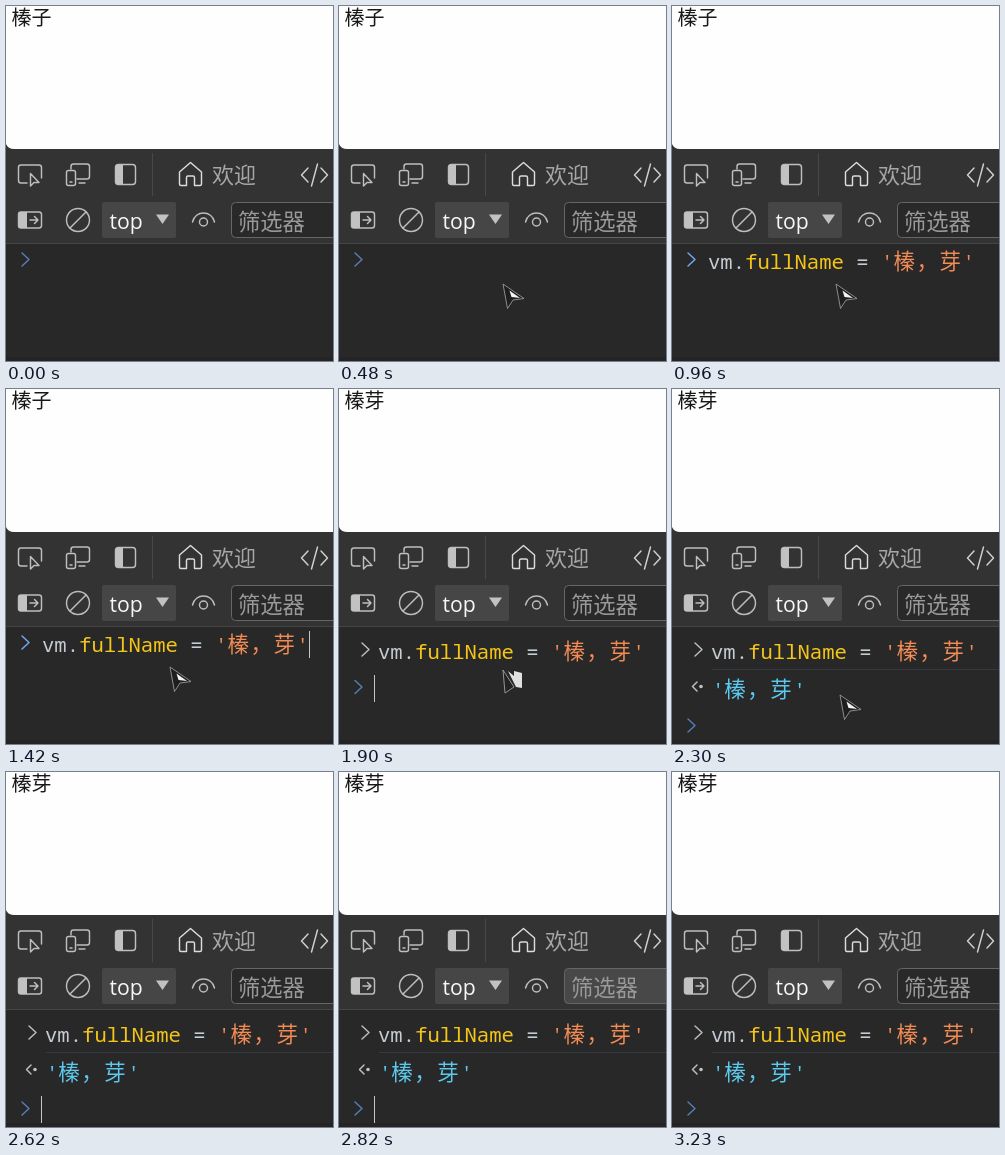
An HTML page that plays this animation: 327 px wide and 355 px high, repeating every 3.89 s.

```html
<!DOCTYPE html>
<html lang="zh-CN">
<head>
<meta charset="utf-8">
<style>
html, body { margin: 0; width: 100%; height: 100%; overflow: hidden; background: #282828; }
svg { display: block; width: 327px; height: 355px; }
text { font-family: "Noto Sans CJK SC", "Noto Sans CJK", sans-serif; white-space: pre; }
.mono { font: 500 20.6px "Noto Sans Mono", monospace; }
.cjk { font: 21.5px "Noto Sans CJK SC", "Noto Sans CJK", sans-serif; letter-spacing: 1.5px; }
.line { fill: none; stroke: #bebebe; stroke-width: 1.45; stroke-linejoin: round; stroke-linecap: round; }
.solid { fill: #c2c2c2; }
</style>
</head>
<body>
<svg viewBox="0 0 327 355">
  <rect width="327" height="355" fill="#282828"/>
  <rect y="130" width="327" height="108" fill="#333"/>
  <path d="M0 0H327V143H8Q2 143 0 138Z" fill="#fefefe"/>
  <path d="M0 237.5H327" stroke="#454545"/>
  <path d="M146.500 147V190" stroke="#484848"/>
  <rect y="351" width="327" height="4" fill="#252324"/>
  <text id="page" x="5.500" y="18.500" font-size="20" fill="#181818"></text>

  <g class="line">
    <path d="M21 177H15Q12.500 177 12.500 174.500V161.500Q12.500 159 15 159H33Q35.500 159 35.500 161.500V172M24.500 167.500V180L28 176.500H33Z"/>
    <path d="M65 163V160.500Q65 158 67.500 158H81Q83.500 158 83.500 160.500V170.500Q83.500 173 81 173H71M73 177H79"/>
    <rect x="60.500" y="164.500" width="9" height="15" rx="2"/>
    <path d="M64 176H66"/>
    <rect x="109.500" y="158.500" width="20" height="20" rx="3"/>
    <path d="M173.500 166L184.500 156.500L195.500 166V178Q195.500 179.500 194 179.500H188.500V171.500Q188.500 170 187 170H182Q180.500 170 180.500 171.500V179.500H175Q173.500 179.500 173.500 178Z" stroke="#dcdcdc"/>
    <path d="M302 162L295.500 169L302 176M315 162L321.500 169L315 176M311.500 158L305.500 180" stroke="#d0d0d0"/>
    <rect x="12.500" y="206" width="23" height="16" rx="2.500"/>
    <path d="M24 214H32M28.500 210.500L32 214L28.500 217.500"/>
    <circle cx="72" cy="214" r="11.500"/>
    <path d="M64 222L80 206"/>
    <path d="M186.500 216C189 204 206 204 208.500 216"/>
    <circle cx="197.500" cy="216" r="4"/>
  </g>
  <path class="solid" d="M110 159H117V178H110ZM13 206H21V222H13Z"/>
  <text x="206" y="176.500" font-size="22" fill="#a6a6a6">欢迎</text>

  <rect x="96" y="196" width="74" height="36" rx="2" fill="#464646"/>
  <text x="103.500" y="222.500" fill="#f8f8f8" style="font:500 21.2px 'Open Sans',sans-serif">top</text>
  <path class="solid" d="M150 208.500H163L156.500 218Z"/>
  <rect id="filter" x="225.500" y="196.500" width="120" height="35" rx="4" stroke="#666"/>
  <text x="232" y="223.500" font-size="22.300" fill="#999">筛选器</text>

  <g id="command">
    <text class="mono" fill="#c4ccd4"><tspan id="object"></tspan><tspan id="property" fill="#f5c518"></tspan><tspan id="equals"></tspan><tspan id="open" fill="#f28b54"></tspan><tspan id="word" class="cjk" fill="#f28b54"></tspan><tspan id="close" fill="#f28b54"></tspan></text>
  </g>
  <path id="sent" class="line" d="M23 254L30 260.500L23 267"/>
  <path id="rule" d="M40 280.500H327" stroke="#353a42"/>
  <g id="result">
    <path class="line" d="M25 293L20.500 297.500L25 302"/>
    <circle class="solid" cx="29" cy="297.500" r="1.800"/>
    <text class="mono" x="40" y="308" fill="#5cc9ee">'<tspan class="cjk">榛，芽</tspan>'</text>
  </g>
  <path id="prompt" class="line" d="M-3.500 -6.500L3.500 0L-3.500 6.500"/>
  <rect id="caret" width="1" height="27" fill="#c4c4c4"/>
  <g id="pointer">
    <path d="M0 0L21 14.500L10 16L4.500 24.500Z" fill="#1e1e1e" stroke="#a8a8a8" stroke-width=".8"/>
    <path d="M6.500 6.500L17 14L8.500 13Z" fill="#f4f4f4"/>
  </g>
  <g id="click">
    <path d="M164 281L175 298L166 304Z" fill="#222" stroke="#b0b0b0" stroke-width=".8"/>
    <path d="M169 282L175 287V282L183 284V299L177 298Z" fill="#e0e0e0"/>
  </g>
</svg>
<script>
const LOOP = 3890;
const $ = id => document.getElementById(id);
const show = (id, on) => $(id).style.display = on ? '' : 'none';
const place = (id, x, y) => $(id).setAttribute('transform', `translate(${x} ${y})`);
const within = (t, a, b) => t >= a && t < b;
const parts = [['object', 'vm.'], ['property', 'fullName'], ['equals', ' = '], ['open', "'"], ['word', '榛，芽'], ['close', "'"]];

function typeCommand(count) {
  for (const [id, text] of parts) {
    $(id).textContent = text.slice(0, Math.max(0, count));
    count -= text.length;
  }
}

function draw(t) {
  const sent = t >= 1900, done = t >= 1960;
  const typed = t < 680 ? 0 : Math.min(19, 4 * (Math.floor((t - 680) / 70) + 1));
  $('page').textContent = sent ? '榛芽' : '榛子';
  typeCommand(typed);
  place('command', sent ? 39 : 36, sent ? 270 : 263);
  show('sent', sent);
  show('rule', done);
  show('result', done);

  const promptY = done ? 336.5 : sent ? 298 : 253.5;
  place('prompt', 19.5, promptY);
  $('prompt').style.stroke = within(t, 680, 1900) ? '#76a9f5' : '#557fb5';

  const caretOn = within(t, 680, 960) || within(t, 1420, 2040) || within(t, 2620, 3230);
  show('caret', caretOn);
  const width = $('command').firstElementChild.getComputedTextLength();
  place('caret', sent ? 35 : Math.round(36 + width), Math.floor(sent ? promptY - 12 : 242));

  // The filter lights up as the pointer leaves across it.
  $('filter').setAttribute('fill', within(t, 2820, 2880) ? '#484848' : '#292929');

  // The pointer glides in from the upper right, then drops away.
  const step = Math.min(3, Math.floor((t - 260) / 73));
  const rest = (1 - step / 3) ** 2;
  const clicking = within(t, 1900, 1960);
  show('click', clicking);
  show('pointer', within(t, 260, 2360) && !clicking);
  if (t < 1900) place('pointer', 164 + 142 * rest, 278 - 258 * rest);
  else place('pointer', 168, t < 2300 ? 280 : 306);
}

function tick(now) {
  draw(now % LOOP);
  requestAnimationFrame(tick);
}
draw(0);
requestAnimationFrame(tick);
</script>
</body>
</html>
```
